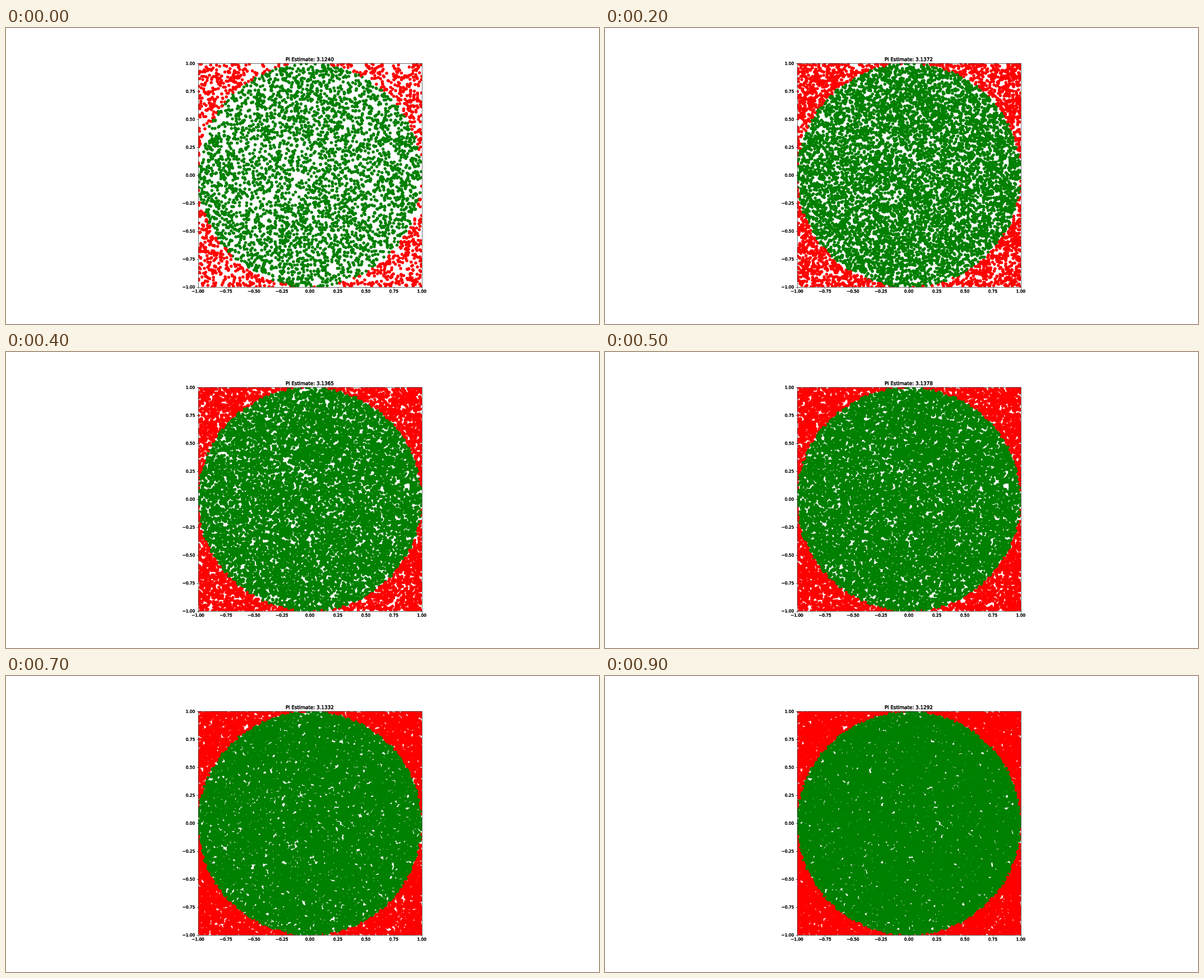
Recreate the animation shown at these times as a matplotlib script. Size 1058 by 529 pixels, loop 1000 ms.

```python
import numpy as np
import matplotlib.pyplot as plt
from matplotlib.animation import FuncAnimation
from matplotlib.patheffects import withStroke

DPI = 52.9
FIRST, STEP = 5000, 2500
# Points inside the circle after each batch
HITS = [3905, 5875, 7843, 9797, 11762, 13728, 15676, 17624, 19569, 21513]
FRAMES = len(HITS)

rng = np.random.default_rng(314)


def batch(size, hits):
    """Uniform points in the square with a fixed number inside the circle."""
    pool = rng.uniform(-1, 1, (size * 2, 2))
    inside = np.hypot(*pool.T) <= 1
    pts = np.vstack([pool[inside][:hits], pool[~inside][:size - hits]])
    return rng.permutation(pts)


sizes = [FIRST] + [STEP] * (FRAMES - 1)
points = np.vstack([batch(n, h) for n, h in zip(sizes, np.diff([0] + HITS))])
colors = np.where(np.hypot(*points.T) <= 1, "green", "red")

fig, ax = plt.subplots(figsize=(20, 10), dpi=DPI)
fig.subplots_adjust(left=0.125, right=0.9, bottom=0.125, top=0.88)
ax.set(xlim=(-1, 1), ylim=(-1, 1), aspect="equal")

dots = ax.scatter(*points[:FIRST].T, s=36, c=colors[:FIRST], linewidths=1.5)
title = ax.set_title("", fontsize=12)

bolder = [withStroke(linewidth=0.45, foreground="black")]
for label in [title, *ax.get_xticklabels(), *ax.get_yticklabels()]:
    label.set_path_effects(bolder)


def draw(i):
    n = FIRST + STEP * i
    dots.set_offsets(points[:n])
    dots.set_color(colors[:n])
    title.set_text(f"Pi Estimate: {4 * HITS[i] / n:.4f}")
    return dots, title


anim = FuncAnimation(fig, draw, frames=FRAMES, interval=100,
                     repeat=True, repeat_delay=0)
plt.show()
```
